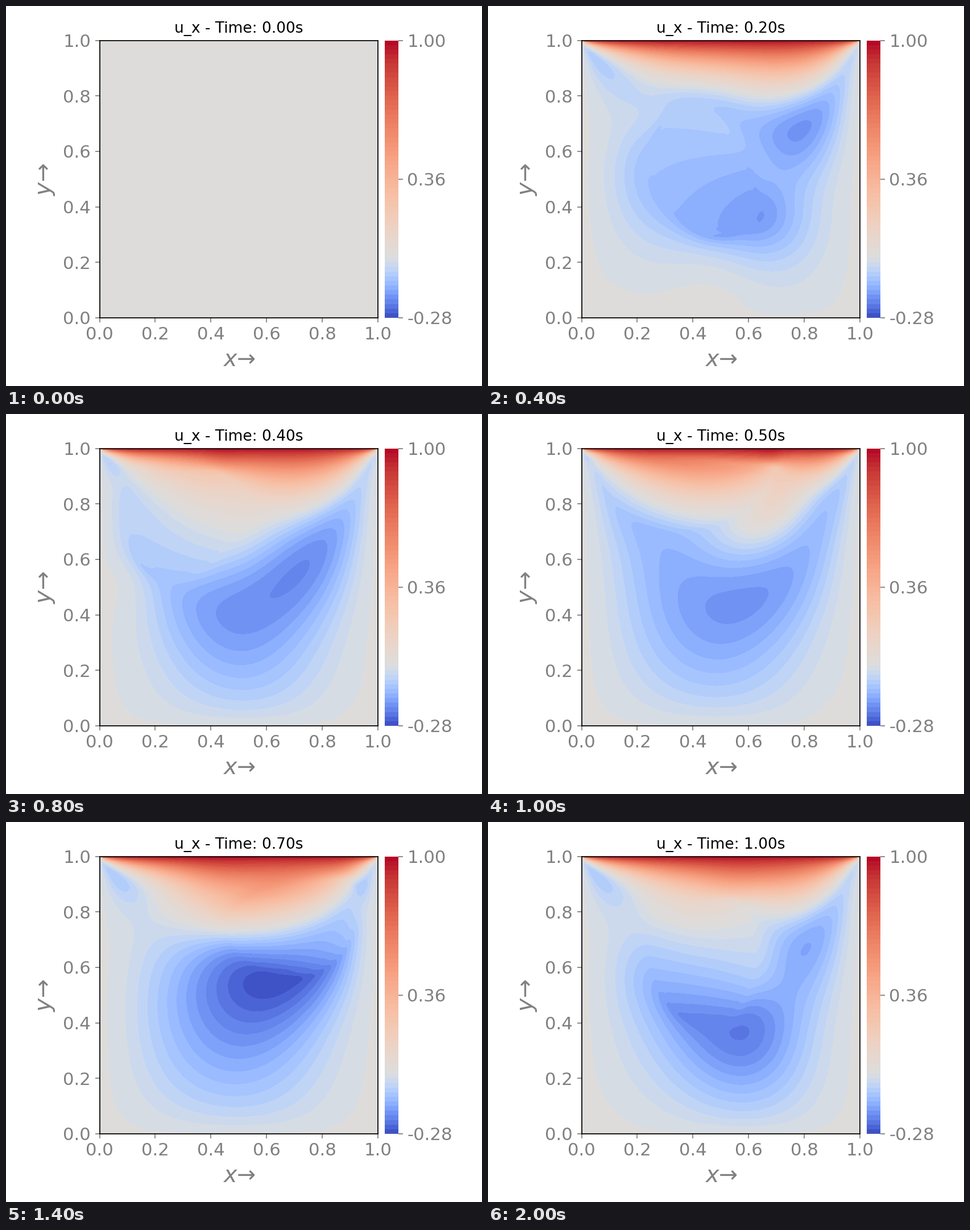
Animation of 837x669 px, one loop 2.2 s. Source, as a matplotlib script:

```python
import numpy as np
import matplotlib.pyplot as plt
from matplotlib.animation import FuncAnimation
from matplotlib.colors import TwoSlopeNorm
from matplotlib.tri import Triangulation

W, H, DPI = 837, 669, 128
FRAMES, INTERVAL = 11, 200

# Lid-driven cavity holding a soft neo-Hookean disc (immersed boundary method)
N = 80
h = 1 / N
NU, SHEAR, BULK = 0.01, 0.1, 0.2
SHOT, SUB = 0.1, 32
dt = SHOT / SUB
OFF = np.arange(-1, 2)

lid = np.ones(N + 1)
lid[[0, -1]] = 0

k = np.arange(N)
C = np.cos(np.pi * np.outer(k, k + 0.5) / N) * np.sqrt(2 / N)
C[0] /= np.sqrt(2)
CT = C.T.copy()
lam = (2 * np.cos(np.pi * k / N) - 2) / h**2
eig = lam[:, None] + lam[None, :]
eig[0, 0] = 1


def mul(a, b):
    # half-width blocks keep the product on one thread
    m = N // 2
    return np.hstack((a @ b[:, :m], a @ b[:, m:]))


def poisson(rhs):
    q = mul(mul(C, rhs), CT) / eig
    q[0, 0] = 0
    return mul(mul(CT, q), C)


def lap(a):
    return (a[2:, 1:-1] + a[:-2, 1:-1] + a[1:-1, 2:] + a[1:-1, :-2]
            - 4 * a[1:-1, 1:-1]) / h**2


def walls(u, v):
    u[:, 0] = -u[:, 1]
    u[:, -1] = 2 * lid - u[:, -2]
    v[0] = -v[1]
    v[-1] = -v[-2]


def advection(u, v):
    uu = (0.5 * (u[1:, 1:-1] + u[:-1, 1:-1]))**2
    vv = (0.5 * (v[1:-1, 1:] + v[1:-1, :-1]))**2
    uv = 0.25 * (u[:, 1:] + u[:, :-1]) * (v[1:] + v[:-1])
    au = (uu[1:] - uu[:-1] + uv[1:-1, 1:] - uv[1:-1, :-1]) / h
    av = (vv[:, 1:] - vv[:, :-1] + uv[1:, 1:-1] - uv[:-1, 1:-1]) / h
    return au, av


def weights(s, n):
    i = np.clip(np.rint(s).astype(int), 1, n - 2)
    r = s - i
    q = np.sqrt(np.maximum(1 - 3 * r * r, 0))
    w = np.stack(((2 - 3 * r - q) / 6, (1 + q) / 3, (2 + 3 * r - q) / 6))
    return i + OFF[:, None], w


def stencil(sx, sy, shape):
    i, wx = weights(sx, shape[0])
    j, wy = weights(sy, shape[1])
    return i[:, None] * shape[1] + j[None], wx[:, None] * wy[None]


def sample(a, st):
    return (a.ravel()[st[0]] * st[1]).sum((0, 1))


def spread(f, st, shape):
    g = np.bincount(st[0].ravel(), (st[1] * f).ravel(),
                    minlength=shape[0] * shape[1])
    return g.reshape(shape) / h**2


def disc_mesh(cx, cy, radius, rings):
    pts = [(cx, cy)]
    for ring in range(1, rings + 1):
        a = 2 * np.pi * np.arange(6 * ring) / (6 * ring)
        r = radius * ring / rings
        pts += list(zip(cx + r * np.cos(a), cy + r * np.sin(a)))
    pts = np.array(pts)
    return pts, Triangulation(pts[:, 0], pts[:, 1]).triangles


def shape_gradients(pts, tri):
    p = pts[tri]
    e1, e2 = p[:, 1] - p[:, 0], p[:, 2] - p[:, 0]
    det = e1[:, 0] * e2[:, 1] - e1[:, 1] * e2[:, 0]
    g1 = np.stack((e2[:, 1], -e2[:, 0]), 1) / det[:, None]
    g2 = np.stack((-e1[:, 1], e1[:, 0]), 1) / det[:, None]
    return np.stack((-g1 - g2, g1, g2), 1), np.abs(det) / 2


def elastic(pos, tri, grad, area):
    F = np.matmul(pos[tri].transpose(0, 2, 1), grad)
    a, b, c, d = F[:, 0, 0], F[:, 0, 1], F[:, 1, 0], F[:, 1, 1]
    J = np.maximum(a * d - b * c, 0.2)
    m = (BULK * np.log(J) - SHEAR) / J
    P = SHEAR * F
    P[:, 0, 0] += m * d
    P[:, 0, 1] -= m * c
    P[:, 1, 0] -= m * b
    P[:, 1, 1] += m * a
    f = -np.matmul(grad, P.transpose(0, 2, 1)) * area[:, None, None]
    ids = tri.ravel()
    return [np.bincount(ids, f[:, :, i].ravel(), minlength=len(pos))
            for i in (0, 1)]


def simulate(shots):
    pos, tri = disc_mesh(0.6, 0.5, 0.2, 18)
    grad, area = shape_gradients(pos, tri)
    u, v = np.zeros((N + 1, N + 2)), np.zeros((N + 2, N + 1))
    fields, centres = [u.copy()], [pos[:, 0].mean()]
    walls(u, v)
    inner = (slice(1, -1), slice(1, -1))
    for step in range(1, shots * SUB + 1):
        x, y = pos[:, 0] / h, pos[:, 1] / h
        su = stencil(x, y + 0.5, u.shape)
        sv = stencil(x + 0.5, y, v.shape)
        fx, fy = elastic(pos, tri, grad, area)
        au, av = advection(u, v)
        du = NU * lap(u) - au + spread(fx, su, u.shape)[inner]
        dv = NU * lap(v) - av + spread(fy, sv, v.shape)[inner]
        u[inner] += dt * du
        v[inner] += dt * dv
        p = poisson((u[1:, 1:-1] - u[:-1, 1:-1]
                     + v[1:-1, 1:] - v[1:-1, :-1]) / h)
        u[inner] -= (p[1:] - p[:-1]) / h
        v[inner] -= (p[:, 1:] - p[:, :-1]) / h
        walls(u, v)
        pos[:, 0] += dt * sample(u, su)
        pos[:, 1] += dt * sample(v, sv)
        np.clip(pos, 0.004, 0.996, out=pos)
        if step % SUB == 0:
            fields.append(u.copy())
            centres.append(pos[:, 0].mean())
    return fields, np.array(centres)


fields, centres = simulate(100)

# The disc passes under the middle of the lid on the sixth time step
low = int(centres.argmin())
rising = np.nonzero(centres[low:] > 0.5)[0]
cross = low + rising[0] if len(rising) else 60
stride = int(np.clip(round(cross / 6), 8, 10))

# Figure
VMIN, VMAX = -0.28, 1.0
levels = np.linspace(VMIN, VMAX, 61)
norm = TwoSlopeNorm(0, VMIN, VMAX)
xs = np.linspace(0, 1, N + 1)
ys = np.r_[0, (np.arange(N) + 0.5) * h, 1]


def pt(px):
    return px * 72 / DPI


fig = plt.figure(figsize=(W / DPI, H / DPI), dpi=DPI, facecolor="white")


def box(left, top, right, bottom):
    return fig.add_axes([left / W, 1 - bottom / H,
                         (right - left) / W, (bottom - top) / H])


def style(a):
    a.tick_params(colors="gray", labelsize=pt(30.8), length=pt(7.7),
                  width=pt(1.76), pad=pt(7.7))


ax = box(164.5, 60.5, 654, 549)
ax.set(xlim=(0, 1), ylim=(0, 1))
ax.set_xticks(np.linspace(0, 1, 6))
ax.set_yticks(np.linspace(0, 1, 6))
style(ax)
for s in ax.spines.values():
    s.set_linewidth(pt(1.76))
title = ax.set_title("", fontsize=pt(26.4), pad=pt(13.2))

cax = box(666, 60.5, 690, 549)
mids = (levels[1:] + levels[:-1]) / 2
cax.pcolormesh([0, 1], levels, mids[:, None], cmap="coolwarm", norm=norm)
cax.set_xticks([])
cax.yaxis.tick_right()
cax.set_yticks([VMIN, 0.36, VMAX], ["-0.28", "0.36", "1.00"])
style(cax)
for s in cax.spines.values():
    s.set_visible(False)


def axis_label(text, x, y, angle):
    fig.text(x / W, 1 - y / H, text, color="gray", fontsize=pt(39.6),
             rotation=angle, rotation_mode="anchor",
             ha="center", va="baseline")


axis_label("$x$→", 409.5, 634, 0)
axis_label("$y$→", 79, 305, 90)


def draw(n):
    for c in list(ax.collections):
        c.remove()
    u = fields[n * stride]
    z = np.hstack(((u[:, :1] + u[:, 1:2]) / 2, u[:, 1:-1],
                   (u[:, -2:-1] + u[:, -1:]) / 2))
    z = np.clip(z, VMIN + 1e-4, VMAX - 1e-4)
    ax.contourf(xs, ys, z.T, levels=levels, cmap="coolwarm", norm=norm)
    title.set_text(f"u_x - Time: {n / 10:.2f}s")
    return []


anim = FuncAnimation(fig, draw, frames=FRAMES, interval=INTERVAL,
                     repeat=True, repeat_delay=0, blit=False)
plt.show()
```
